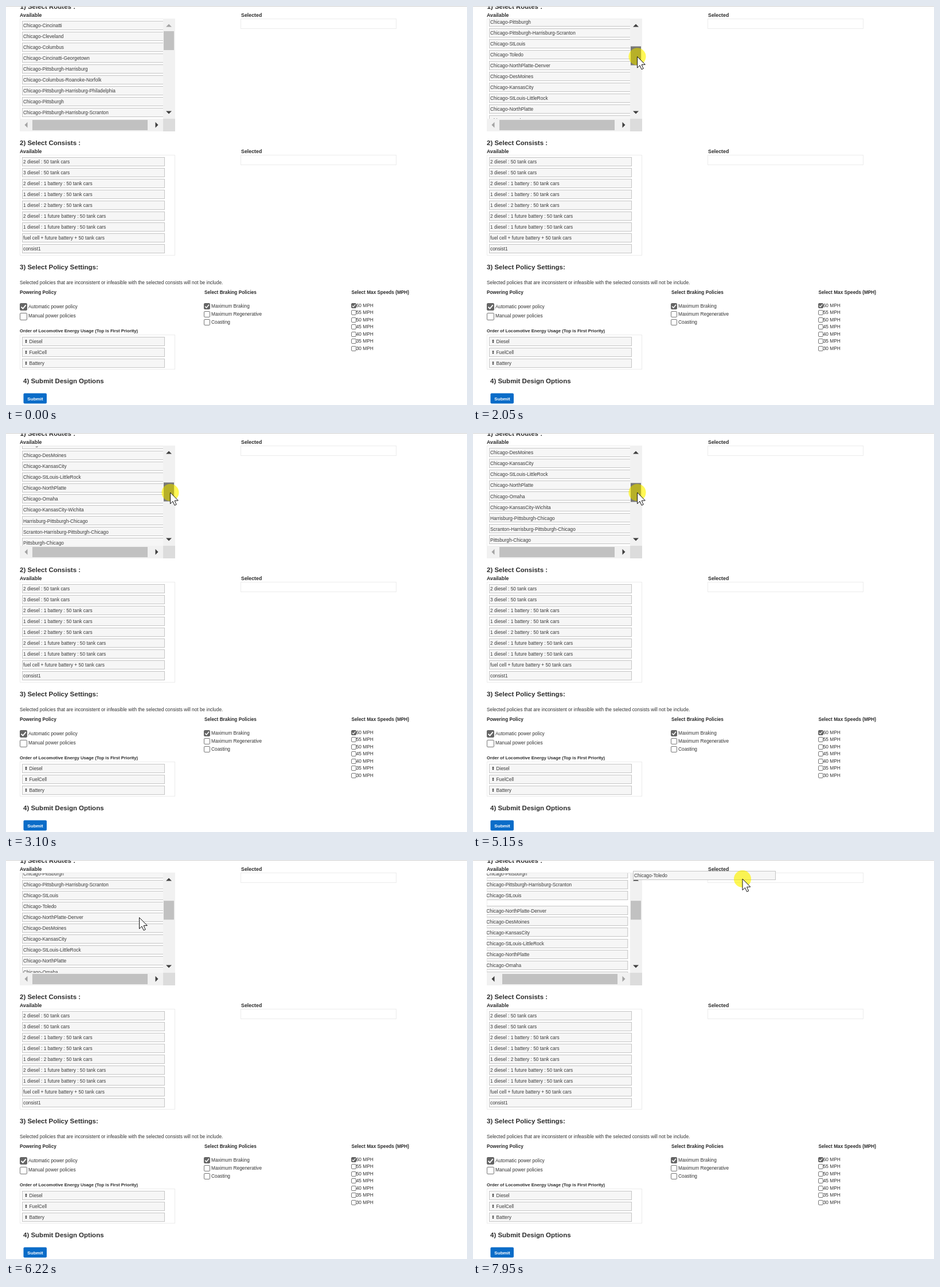
An HTML page with a canvas for the animation above (8000 ms loop, 804 px wide and 697 px high).

```html
<!DOCTYPE html>
<html lang="en">
<head>
<meta charset="utf-8">
<title>Design options</title>
<style>
html, body { margin: 0; width: 100%; height: 100%; overflow: hidden; background: #fff; }
canvas { display: block; }
</style>
</head>
<body>
<canvas id="stage" width="804" height="697"></canvas>
<script>
const ctx = document.getElementById('stage').getContext('2d');
const LOOP = 8000, TICK = 75.6, PITCH = 19.06, DRAGGED = 10;
const SHOW = 370, PRESS = 1560, RELEASE = 5950, GRAB = 6990;

const routes = `Chicago-Cincinatti
Chicago-Cleveland
Chicago-Columbus
Chicago-Cincinatti-Georgetown
Chicago-Pittsburgh-Harrisburg
Chicago-Columbus-Roanoke-Norfolk
Chicago-Pittsburgh-Harrisburg-Philadelphia
Chicago-Pittsburgh
Chicago-Pittsburgh-Harrisburg-Scranton
Chicago-StLouis
Chicago-Toledo
Chicago-NorthPlatte-Denver
Chicago-DesMoines
Chicago-KansasCity
Chicago-StLouis-LittleRock
Chicago-NorthPlatte
Chicago-Omaha
Chicago-KansasCity-Wichita
Harrisburg-Pittsburgh-Chicago
Scranton-Harrisburg-Pittsburgh-Chicago
Pittsburgh-Chicago
Philadelphia-Harrisburg-Pittsburgh-Chicago`.split('\n');

const consists = ['2 diesel : 50 tank cars', '3 diesel : 50 tank cars',
  '2 diesel : 1 battery : 50 tank cars', '1 diesel : 1 battery : 50 tank cars',
  '1 diesel : 2 battery : 50 tank cars', '2 diesel : 1 future battery : 50 tank cars',
  '1 diesel : 1 future battery : 50 tank cars', 'fuel cell + future battery + 50 tank cars',
  'consist1'];

// Pointer moves: start, end, x and y reached
const moves = [
  [SHOW, 450, 559, 436], [590, 750, 330.5, 194], [930, 1480, 285, 58],
  [PRESS, 1738, 285, 69], [1738, 1960, 286.5, 87], [1960, 2646, 286.5, 98.5],
  [2646, 3100, 286.5, 104], [5140, 5510, 287, 87.85],
  [RELEASE, 6195, 232.5, 100.5], [6200, 6800, 218.5, 87],
  [GRAB, 7710, 437, 29], [7710, 7935, 470, 33]];

const clamp = v => Math.min(1, Math.max(0, v));

function pointerAt(t) {
  let x = 590, y = 531;
  for (const [start, end, toX, toY] of moves) {
    const p = clamp((t - start) / (end - start));
    x += (toX - x) * p;
    y += (toY - y) * p;
  }
  return [x, y];
}

// The list follows the held thumb one tick late.
function scrollAt(t) {
  if (t < PRESS) return 0;
  const [, y] = pointerAt(Math.min(t, RELEASE) - TICK);
  return Math.max(0, (y - 60.6) / .19);
}

function text(s, x, y, size = 8.35, weight = 400, color = '#333') {
  ctx.font = `${weight} ${size}px "Liberation Sans", Arial, sans-serif`;
  ctx.fillStyle = color;
  ctx.fillText(s, x, y);
}
const bold = (s, x, y, size = 8.27) => text(s, x, y, size, 700, '#2b2b2b');
const heading = (s, x, y) => bold(s, x, y, 11.5);

function rect(x, y, w, h, color) {
  ctx.fillStyle = color;
  ctx.fillRect(x, y, w, h);
}

function frame(x, y, w, h, color = '#ececec') {
  ctx.strokeStyle = color;
  ctx.lineWidth = 1;
  ctx.strokeRect(x + .5, y + .5, w - 1, h - 1);
}

function shape(points, x, y, fill) {
  ctx.beginPath();
  points.forEach(([px, py]) => ctx.lineTo(x + px, y + py));
  ctx.closePath();
  ctx.fillStyle = fill;
  ctx.fill();
}

// Triangle pointing up, turned by quarter turns clockwise
function arrow(x, y, turns, color, w = 5, h = 2.5) {
  ctx.save();
  ctx.translate(x, y);
  ctx.rotate(turns * Math.PI / 2);
  shape([[-w, h], [0, -h], [w, h]], 0, 0, color);
  ctx.restore();
}

// List entry centred on cy
function item(label, x, cy, indent = 2) {
  const top = Math.floor(cy - 7.8);
  rect(x, top, 249, 16, '#f6f6f6');
  frame(x, top, 249, 16, '#c5c5c5');
  text(label, x + indent, cy + 3, 8.35, 400, '#3a3a3a');
}

function checkbox(x, y, size, checked) {
  ctx.beginPath();
  ctx.roundRect(x + .5, y + .5, size - 1, size - 1, 1.5);
  ctx.fillStyle = checked ? '#666' : '#fff';
  ctx.fill();
  ctx.lineWidth = 1;
  ctx.strokeStyle = checked ? '#666' : '#777';
  ctx.stroke();
  if (!checked) return;
  ctx.beginPath();
  [[.2, .52], [.42, .74], [.82, .26]].forEach(([a, b]) => ctx.lineTo(x + a * size, y + b * size));
  ctx.lineWidth = size * .14;
  ctx.strokeStyle = '#fff';
  ctx.stroke();
}

function page() {
  rect(0, 0, 804, 697, '#fff');
  heading('1) Select Routes :', 24.5, 5);
  rect(0, 0, 804, 1, '#cfcfcf');
  heading('2) Select Consists :', 24, 243);
  for (const y of [18.5, 256.5]) {
    bold('Available', 24, y, 8.85);
    bold('Selected', 410, y, 8.85);
    frame(409, Math.round(y + 3), 272, 18);
  }
  frame(24, 260, 271, 176);
  consists.forEach((s, i) => item(s, 28, 272 + i * PITCH));

  heading('3) Select Policy Settings:', 24, 459.5);
  text('Selected policies that are inconsistent or infeasible with the selected consists will not be include.', 24, 485.5);
  bold('Powering Policy', 24, 502.5);
  ['Automatic power policy', 'Manual power policies'].forEach((s, i) => {
    checkbox(24, 519 + i * 17, 13, i === 0);
    text(s, 39, 527.7 + i * 16.5);
  });
  bold('Select Braking Policies', 346, 502.5);
  ['Maximum Braking', 'Maximum Regenerative', 'Coasting'].forEach((s, i) => {
    checkbox(345, 519 + i * 14, 11, i === 0);
    text(s, 358, 526.8 + i * 14.2);
  });
  bold('Select Max Speeds (MPH)', 602.5, 502.5);
  for (let i = 0; i < 7; i++) {
    checkbox(602, Math.floor(519 + i * 12.5), 9, i === 0);
    text(60 - i * 5 + ' MPH', 610.7, 526 + i * 12.45);
  }

  bold('Order of Locomotive Energy Usage (Top is First Priority)', 24, 569.5, 7.7);
  frame(24, 574, 271, 61);
  ['Diesel', 'FuelCell', 'Battery'].forEach((s, i) => {
    const y = 585.8 + i * PITCH;
    item(s, 28, y, 12.5);
    arrow(35, y - 2, 0, '#333', 1.8, 1.2);
    arrow(35, y + 2, 2, '#333', 1.8, 1.2);
    rect(34.5, y - 2, 1, 4, '#333');
  });

  heading('4) Submit Design Options', 30, 659.3);
  ctx.beginPath();
  ctx.roundRect(30.5, 676.5, 40.5, 18, 2);
  ctx.fillStyle = '#0a6cc8';
  ctx.fill();
  text('Submit', 37.3, 688.5, 8.1, 700, '#fff');
}

function routeList(scroll, shift, dragging, held) {
  frame(24, 22, 271, 197);
  ctx.save();
  ctx.beginPath();
  ctx.rect(24, 23, 250, 174);
  ctx.clip();
  routes.forEach((s, i) => {
    if (dragging && i === DRAGGED) return;
    const gap = dragging && i > DRAGGED ? 11.6 : 0;
    item(s, 28 - shift, 34 + i * PITCH - scroll - gap);
  });
  ctx.restore();

  const on = '#404040', off = '#a3a3a3';
  rect(274, 22, 21, 175, '#f1f1f1');
  rect(24, 197, 250, 22, '#f1f1f1');
  rect(274, 197, 21, 22, '#dcdcdc');
  rect(275, 44 + scroll * .19, 18, 33, held ? '#787878' : '#c1c1c1');
  rect(46 + shift * .75, 199, 201, 18, '#c1c1c1');
  arrow(284, 34, 0, scroll < 25 ? off : on);
  arrow(263, 207.7, 1, shift ? off : on);
  arrow(284, 186, 2, on);
  arrow(35, 207.7, 3, shift ? on : off);
}

function highlight(x, y) {
  ctx.save();
  ctx.beginPath();
  ctx.arc(x, y, 15, 0, 7);
  ctx.fillStyle = 'rgba(255, 240, 0, .47)';
  ctx.fill();
  ctx.globalCompositeOperation = 'multiply';
  ctx.fillStyle = 'rgb(255, 255, 160)';
  ctx.fill();
  ctx.restore();
}

function pointer(x, y) {
  shape([[0, 0], [0, 19.6], [4.5, 15.4], [7.6, 22.4], [10.7, 21], [7.6, 14.2], [13.8, 14]], x, y, '#fff');
  ctx.lineWidth = 1;
  ctx.strokeStyle = '#111';
  ctx.stroke();
}

function draw(now) {
  const t = now % LOOP, step = Math.floor(t / TICK) * TICK;
  const [x, y] = pointerAt(step);
  const held = t >= PRESS && t < RELEASE, dragging = t >= GRAB;
  const shift = dragging ? 6.7 * clamp((x - 250) / 20) : 0;
  page();
  routeList(scrollAt(step), shift, dragging, held);
  if (dragging) item(routes[DRAGGED], Math.round(x - 191), y - 6);
  if (held || dragging) highlight(x, y);
  if (t >= SHOW) pointer(x, y);
  requestAnimationFrame(draw);
}
requestAnimationFrame(draw);
</script>
</body>
</html>
```
